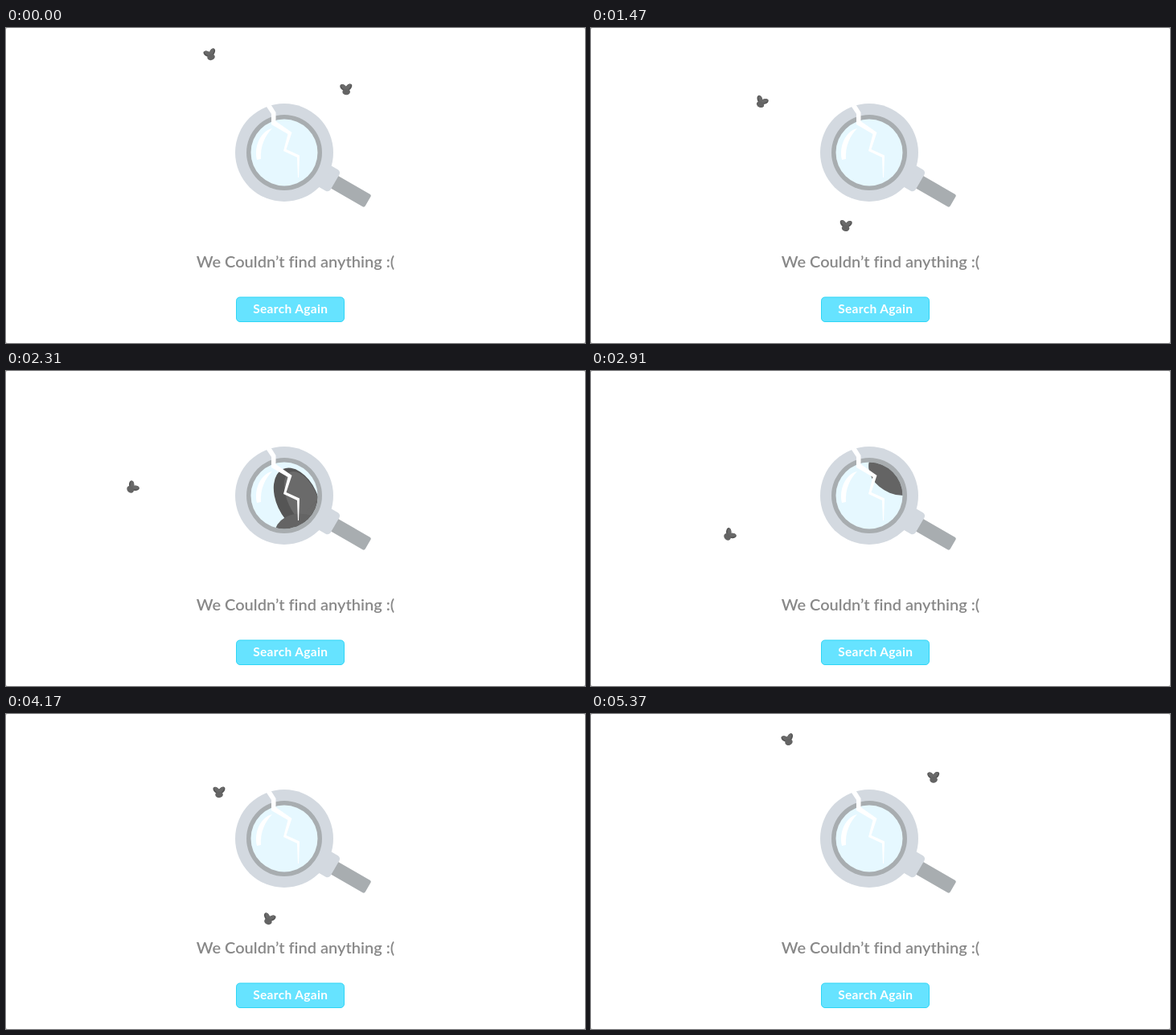
An HTML page for the animation above (5.4 s loop, 720 px wide and 392 px high).

```html
<!DOCTYPE html>
<html lang="en">
<head>
<meta charset="utf-8">
<title>Nothing found</title>
<style>
  html, body { margin: 0; width: 100%; height: 100%; overflow: hidden; background: #bbb; }
  svg { display: block; width: 720px; height: 392px; }
  text { font-family: Lato, "Open Sans", sans-serif; text-anchor: middle; font-variant-ligatures: none; }
</style>
</head>
<body>
<svg viewBox="0 0 720 392">
  <defs>
    <g id="fly">
      <g id="wing" transform="translate(-3.2 -2) rotate(-45)">
        <ellipse rx="3.2" ry="5.2" fill="#555"/>
        <ellipse cx=".8" cy=".3" rx="2.3" ry="4.6" fill="#6a6a6a"/>
      </g>
      <use href="#wing" transform="scale(-1 1)"/>
      <ellipse cy="3.4" rx="4.8" ry="3.8" fill="#646464"/>
    </g>
    <clipPath id="glass"><circle cx="346" cy="155" r="41.5"/></clipPath>
  </defs>
  <rect width="720" height="392" rx="2" fill="#fff"/>

  <use id="a" href="#fly"/>
  <use id="b" href="#fly"/>

  <g transform="translate(346 155) rotate(30)">
    <rect x="66" y="-8.5" width="54.500" height="18" rx="2.500" fill="#a8adb0"/>
    <rect x="48" y="-15" width="25" height="30.500" rx="4.500" fill="#d3d9e0"/>
  </g>
  <g transform="translate(346 155)">
    <circle r="61" fill="#d3d9e0"/>
    <circle r="47" fill="#a8adb0"/>
    <circle r="41.500" fill="#e6f8ff"/>
  </g>
  <g clip-path="url(#glass)"><use id="big" href="#fly"/></g>
  <g fill="#fff">
    <path d="M331 125C317 128 308 147 312 164L317 163C316 147 322 134 331 125Z"/>
    <path d="M322 95L330 107V120L350.500 132L345 153L362 161L363 186H364L365 158.500L348.500 151L355.500 130L335.500 116V105L328 93Z"/>
  </g>

  <text x="360" y="298" font-size="20" font-weight="600" fill="#888">We Couldn’t find anything :(</text>
  <rect x="286.500" y="335" width="134" height="30.500" rx="4.500" fill="#66e3ff" stroke="#2fd5f5"/>
  <text x="353.800" y="355" font-size="15.500" font-weight="700" letter-spacing=".35" fill="#fff">Search Again</text>
</svg>
<script>
  const LOOP = 5400, STEP = 30, ZOOM = 8, SPREAD = 1.5;
  const lens = { x: 346, y: 155 };

  // A fly follows a smooth closed curve through a few points (time, x, y)
  // and sways once per loop around its mean tilt.
  const flyA = {
    id: "a", lean: 2, sway: 20,
    path: [
      [0, 254, 33], [210, 322, 60], [480, 285, 117], [840, 253, 193], [1290, 290, 253],
      [1740, 355, 218], [2310, 369, 174], [2910, 377, 117], [3150, 387, 88], [3450, 354, 72],
      [4170, 265, 97], [4740, 199, 102], [4980, 175, 66], [5160, 188, 38]
    ]
  };
  const flyB = {
    id: "b", lean: 22, sway: 25,
    path: [
      [0, 423, 76], [480, 364, 64], [1470, 212, 92], [2310, 157, 145],
      [2910, 172, 204], [4170, 327, 255], [4590, 396, 207], [5160, 435, 111]
    ]
  };

  // Point i of a looping path, with its time carried past the ends
  function pointAt(path, i) {
    const n = path.length, lap = Math.floor(i / n);
    const [t, x, y] = path[i - lap * n];
    return [t + lap * LOOP, x, y];
  }

  function position(path, t) {
    const i = path.findLastIndex(k => k[0] <= t);
    const [p, q, r, s] = [-1, 0, 1, 2].map(d => pointAt(path, i + d));
    const span = r[0] - q[0], u = (t - q[0]) / span;
    return [1, 2].map(c => {
      const m = (r[c] - p[c]) / (r[0] - p[0]) * span;
      const n = (s[c] - q[c]) / (s[0] - q[0]) * span;
      const d = r[c] - q[c];
      return q[c] + u * (m + u * (3 * d - 2 * m - n + u * (m + n - 2 * d)));
    });
  }

  function place(id, x, y, angle, scale = 1) {
    document.getElementById(id).setAttribute("transform",
      `translate(${x} ${y}) rotate(${angle}) scale(${scale})`);
  }

  function fly({ id, lean, sway, path }, t) {
    const [x, y] = position(path, t);
    const angle = lean - sway * Math.cos(2 * Math.PI * t / LOOP);
    place(id, x, y, angle);
    return { x, y, angle };
  }

  function draw(now) {
    const t = Math.floor(now % LOOP / STEP) * STEP;
    const { x, y, angle } = fly(flyA, t);
    fly(flyB, t);

    // The glass enlarges the first fly only while it passes behind it
    const behind = t > 1700 && t < 3300;
    place("big", lens.x + SPREAD * (x - lens.x), lens.y + SPREAD * (y - lens.y),
      angle, behind ? ZOOM : 0);
  }

  const start = performance.now();
  function frame() {
    draw(performance.now() - start);
    requestAnimationFrame(frame);
  }
  frame();
</script>
</body>
</html>
```
